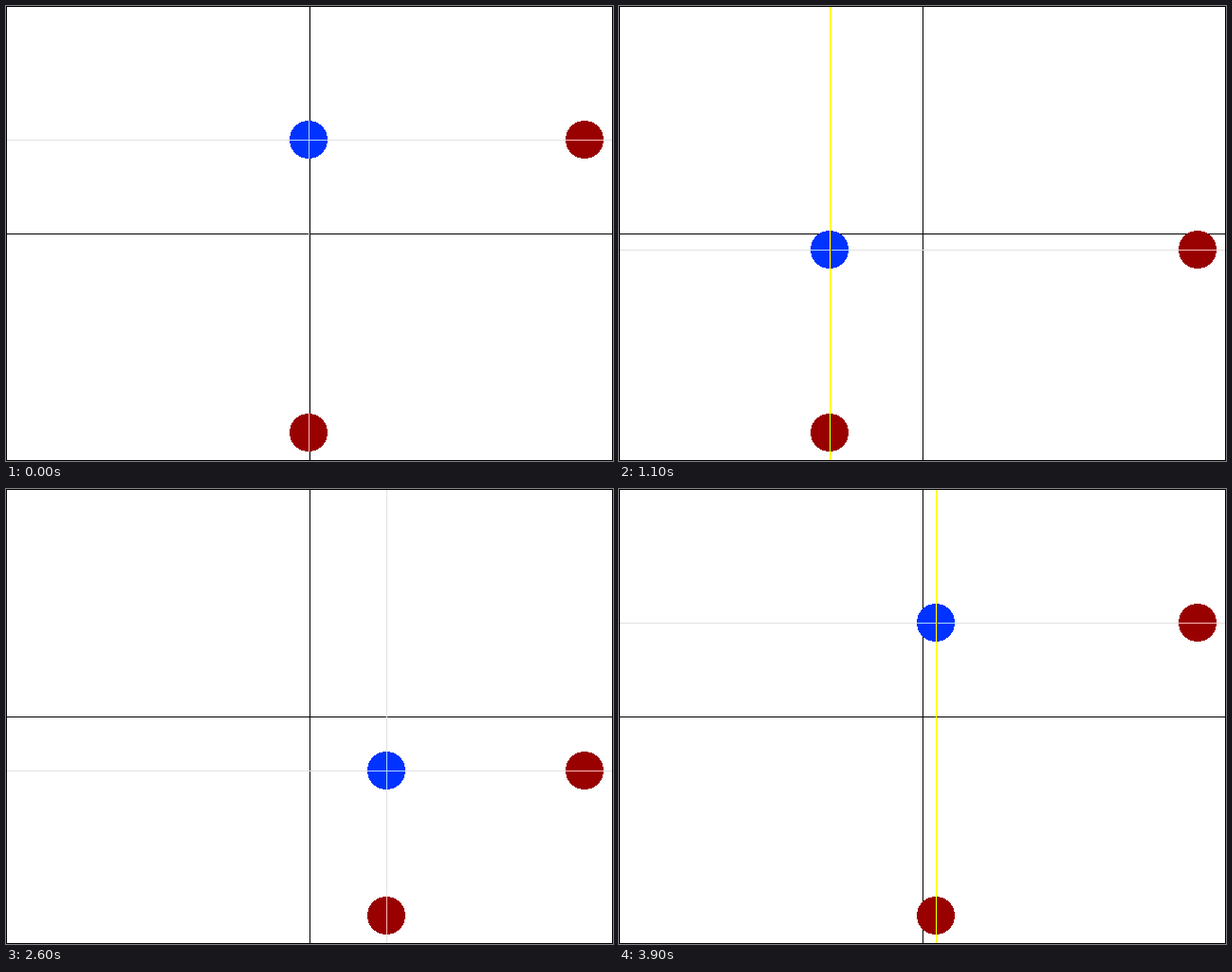
Animation of 640 by 480 pixels, one loop 4 s. Source, as an HTML page with a canvas:

```html
<!DOCTYPE html>
<html lang="en">
<head>
<meta charset="utf-8">
<title>Circular motion and its two projections</title>
<style>
  html, body { margin: 0; width: 100%; height: 100%; overflow: hidden; background: #fff; }
  canvas { display: block; }
</style>
</head>
<body>
<canvas id="stage" width="640" height="480"></canvas>
<script>
const W = 640, H = 480, CX = 320, CY = 240;
const ORBIT = 100, R = 20, RAIL_X = 610, RAIL_Y = 450;
const LOOP = 4000, STEP = 100;
const BLUE = { fill: '#0033ff', light: '#a7daff', dark: '#585800' };
const RED = { fill: '#990000', light: '#ffb4b4', dark: '#4b4b00' };
const ctx = document.getElementById('stage').getContext('2d');

function box(color, x, y, w, h) {
  ctx.fillStyle = color;
  ctx.fillRect(x, y, w, h);
}

// Hard-edged disc, one span per pixel row
function disc(x, y, color) {
  for (let j = -R; j < R; j++) {
    const half = Math.round(Math.sqrt(R * R - (j + 0.5) ** 2));
    box(color, x - half, y + j, 2 * half, 1);
  }
}

// Guide through two disc centres: yellow on even pixels, grey on odd ones
function guide(vertical, pos, mid, rail) {
  const run = (color, at, from, len) => vertical
    ? box(color, at, from, 1, len)
    : box(color, from, at, len, 1);
  const end = vertical ? H : W;
  const yellow = pos % 2 === 0;
  const stops = [[mid, BLUE], [rail, RED]];

  run(yellow ? '#ffff00' : '#e1e1e1', pos, 0, end);
  if (yellow) {
    ctx.globalCompositeOperation = 'multiply';
    run('#ffff1d', pos + 1, 0, end);
    ctx.globalCompositeOperation = 'source-over';
  }
  for (const [c, tone] of stops) {
    if (yellow) run(tone.dark, pos + 1, c - R, 2 * R);
    else run(tone.light, pos, c - R, 2 * R);
  }
}

function draw(time) {
  const step = Math.floor((time % LOOP) / STEP);
  const angle = (step * 10 + 1) * Math.PI / 200;
  const x = CX - Math.trunc(ORBIT * Math.sin(angle));
  const y = CY - Math.trunc(ORBIT * Math.cos(angle));

  box('#fff', 0, 0, W, H);
  box('#000', CX, 0, 1, H);
  box('#000', 0, CY, W, 1);

  disc(x, y, BLUE.fill);
  disc(x, RAIL_Y, RED.fill);
  disc(RAIL_X, y, RED.fill);

  const across = () => guide(false, y, x, RAIL_X);
  const down = () => guide(true, x, y, RAIL_Y);
  if (x % 2) { down(); across(); } else { across(); down(); }

  ctx.strokeStyle = '#000';
  ctx.strokeRect(0.5, 0.5, W - 1, H - 1);
}

function tick(now) {
  draw(now);
  requestAnimationFrame(tick);
}

draw(0);
requestAnimationFrame(tick);
</script>
</body>
</html>
```
